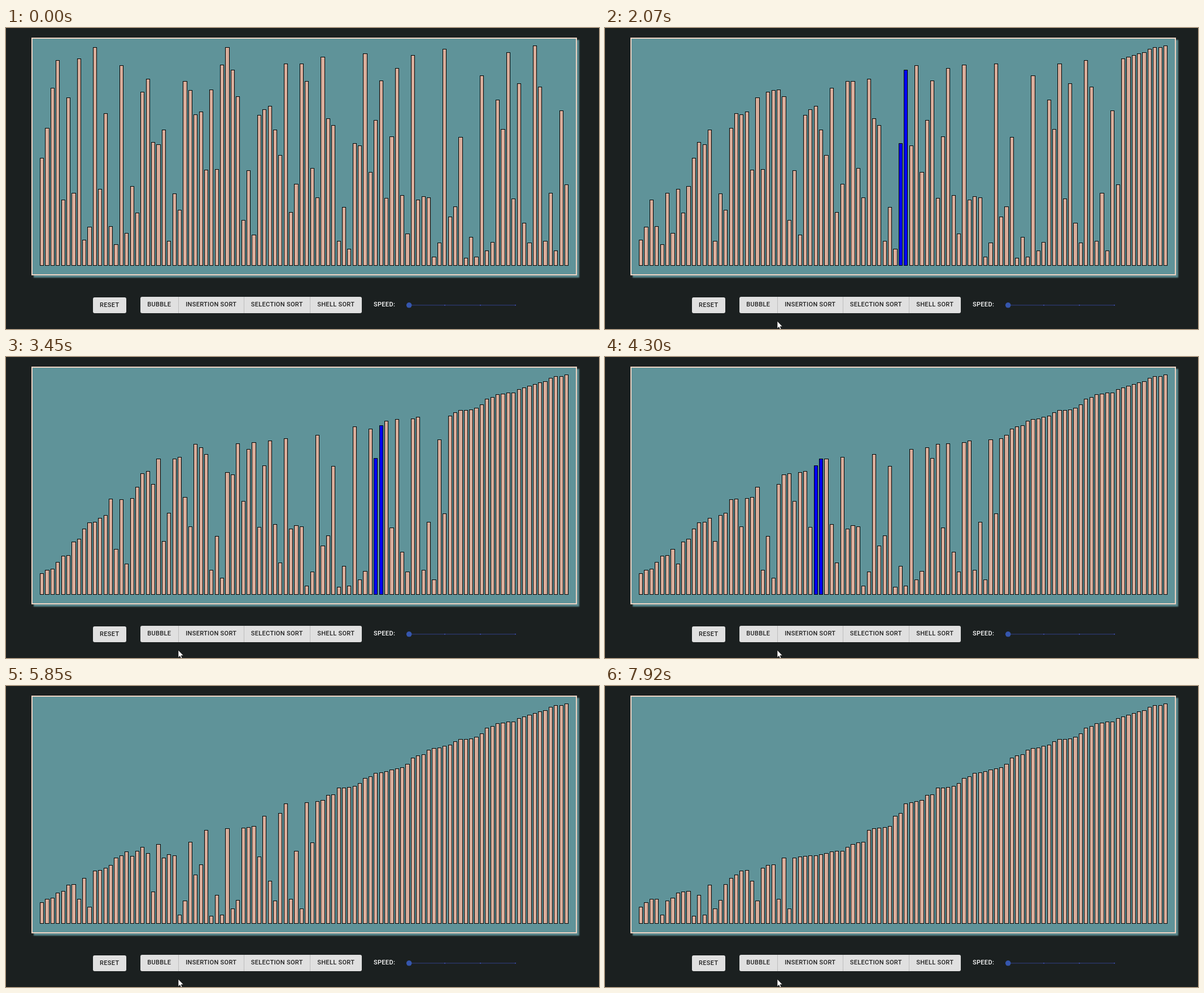
Recreate the animation shown at these times as an HTML page with a canvas. Size 1050 by 533 pixels, loop 8000 ms.

```html
<!DOCTYPE html>
<html lang="en">
<head>
<meta charset="utf-8">
<title>Bubble sort</title>
<style>
  html, body { margin: 0; width: 100%; height: 100%; overflow: hidden; background: #1b2020; }
  #stage { position: relative; width: 1050px; height: 533px; overflow: hidden;
    font: 500 11px/28px Roboto, sans-serif; letter-spacing: .314px; color: #212121; }
  #stage > * { position: absolute; }
  .panel { left: 45px; top: 17px; width: 962px; height: 417px; background: #5f9399;
    border: 2px solid #ecd3c3; box-shadow: 4px 4px 2px #5a888d; }
  .button { background: #e0e0e0; text-align: center; white-space: nowrap; height: 28px;
    box-sizing: border-box; }
  .reset { left: 154px; top: 477px; width: 58.5px; border-radius: 3px; }
  .group { left: 237.5px; top: 476px; height: 28.5px; display: flex; border-radius: 3px; overflow: hidden; }
  .group .button { height: 28.5px; }
  .group .button + .button { border-left: 1px solid #bdbdbd; }
  .speed { left: 651px; top: 476px; color: #fff; }
</style>
</head>
<body>
<div id="stage">
  <div class="panel"></div>
  <canvas id="bars" width="1050" height="533"></canvas>
  <div class="button reset">RESET</div>
  <div class="group">
    <div class="button" id="bubble" style="width:67.5px">BUBBLE</div>
    <div class="button" style="width:115.5px">INSERTION SORT</div>
    <div class="button" style="width:117.5px">SELECTION SORT</div>
    <div class="button" style="width:91.5px">SHELL SORT</div>
  </div>
  <div class="speed">SPEED:</div>
  <svg width="1050" height="533">
    <path d="M714 490.7H902" stroke="#2b3465" stroke-width="1.5"/>
    <path d="M776 490.7h2m61 0h2m60 0h2" stroke="#3f51b5" stroke-width="1.5"/>
    <circle cx="713.7" cy="490.8" r="4.8" fill="#3556ad"/>
    <path id="cursor" d="M0 0V13.2L3 10.4L5 15L7 14.2L5.1 9.7H9.3Z" fill="#fff" stroke="#111" stroke-width=".7"/>
  </svg>
</div>
<script>
const LOOP = 8000, BASE = 421, SLOTS = 100;
const tops = [
  230, 177, 106, 57, 304, 123, 292, 54, 375, 352, 34, 285, 151, 351, 383, 66, 363, 280, 327, 113,
  90, 202, 206, 180, 377, 293, 322, 94, 110, 153, 148, 251, 109, 250, 65, 34, 74, 121, 340, 252,
  366, 154, 144, 138, 180, 225, 63, 326, 276, 63, 94, 248, 300, 51, 160, 172, 377, 317, 391, 204,
  208, 45, 255, 163, 93, 301, 192, 71, 296, 364, 48, 304, 298, 300, 405, 380, 37, 334, 316, 193,
  407, 370, 405, 84, 394, 379, 127, 179, 43, 302, 98, 345, 380, 31, 104, 377, 292, 394, 146, 277];

// Keys are [tick, value, ...]
const progress = [[14.88, 0], [19, 323], [35, 1574], [40, 1982], [45, 2363], [84, 5446], [86, 5596], [103, 6923]];
const pointer = [[2, 484, 515], [6, 306, 486], [7, 306, 486], [11, 272, 491], [16, 272, 493],
  [18, 277, 512], [19, 284, 525], [22, 305, 519]];

const byId = id => document.getElementById(id);
const ctx = byId('bars').getContext('2d');

function interpolate(keys, tick, column) {
  const next = keys.findIndex(key => key[0] >= tick);
  if (next < 0) return keys[keys.length - 1][column];
  if (next === 0) return keys[0][column];
  const a = keys[next - 1], b = keys[next];
  return a[column] + (b[column] - a[column]) * (tick - a[0]) / (b[0] - a[0]);
}

// Every pass takes the same number of slots; shorter passes end with idle ones.
function bubbleSort(lastStep) {
  const list = [...tops];
  let active = -1;
  for (let step = 0; step <= lastStep; step++) {
    const pass = Math.floor(step / SLOTS), j = step % SLOTS;
    active = -1;
    if (j < list.length - 1 - pass && list[j] < list[j + 1]) {
      [list[j], list[j + 1]] = [list[j + 1], list[j]];
      active = j;
    }
  }
  return { list, active };
}

function drawBars({ list, active }) {
  ctx.clearRect(0, 0, 1050, 533);
  list.forEach((top, i) => {
    const x = 60 + i * 9.384, left = Math.round(x), width = Math.round(x + 7.2) - left;
    const isActive = active >= 0 && (i === active || i === active + 1);
    ctx.fillStyle = '#000';
    ctx.fillRect(left, top, width, BASE - top);
    ctx.fillStyle = isActive ? '#00f' : '#d9ad9b';
    ctx.fillRect(left + 1, top + 1, width - 2, BASE - top - 2);
  });
}

function buttonShade(tick) {
  if (tick < 8 || tick > 20) return '#e0e0e0';
  return tick < 15 || tick === 20 ? '#d5d5d5' : '#cccccc';
}

let shown = -1;
function render(now) {
  const time = now % LOOP;
  const tick = Math.floor((Math.floor(time / 10) + 1.51) / 7.7);
  if (tick !== shown) {
    shown = tick;
    drawBars(bubbleSort(tick < 15 ? -1 : Math.round(interpolate(progress, tick, 1))));
    byId('bubble').style.background = buttonShade(tick);
    const cursor = byId('cursor');
    cursor.setAttribute('visibility', tick < 2 ? 'hidden' : 'visible');
    cursor.setAttribute('transform',
      `translate(${interpolate(pointer, tick, 1)} ${interpolate(pointer, tick, 2)})`);
  }
  requestAnimationFrame(() => render(performance.now() - start));
}
const start = performance.now();
render(0);
</script>
</body>
</html>
```
